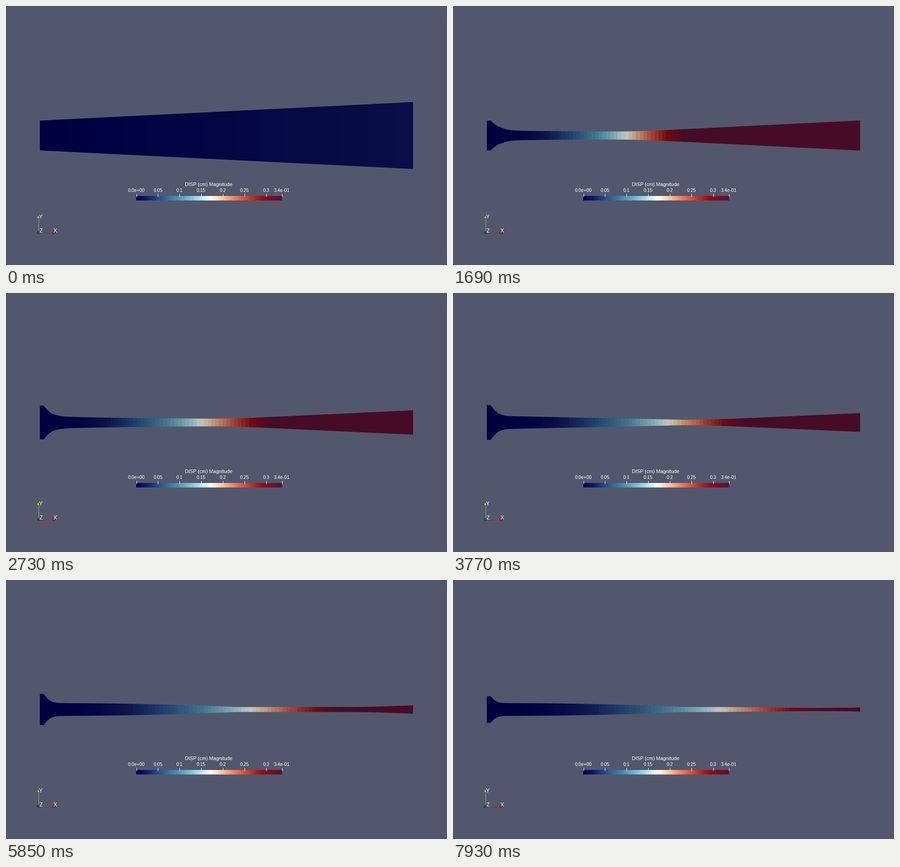
Animation, 976 px wide and 574 px high, one loop 8000 ms. Source, as a matplotlib script:

```python
import numpy as np
import matplotlib.pyplot as plt
from matplotlib.animation import FuncAnimation
from matplotlib.colors import LinearSegmentedColormap
from matplotlib.patches import Circle, Polygon
from matplotlib.path import Path

W, H, DPI = 976, 574, 64
PT = 72 / DPI                  # points per pixel
LOOP, TICK, STEP = 8000, 40, 130
LEFT, RIGHT, MID = 75, 901, 287
RAMP = 12                      # steps until the duct has closed
NECK_X = 510
SHADE = 0.78

STOPS = [
    (0, "#000054"), (.07, "#101a5f"), (.15, "#244c88"), (.3, "#5498b6"),
    (.42, "#9edae6"), (.485, "#def6fa"), (.51, "#fcfaf0"), (.54, "#feecd0"),
    (.6, "#f8be92"), (.74, "#d6523e"), (.87, "#8c0e18"), (1, "#5c1030"),
]
CMAP = LinearSegmentedColormap.from_list("disp", STOPS, N=256)

NODES = np.linspace(LEFT, RIGHT, 101)
CENTRES = (NODES[:-1] + NODES[1:]) / 2


def sigmoid(t):
    return 1 / (1 + np.exp(-t))


def soft_max(a, b, width=2):
    return (a + b + np.hypot(a - b, width)) / 2


def closed_half(k):
    """Half height at the nodes, k steps after the duct has closed."""
    # tapering inlet side, down to the neck
    neck = 5.4 + 2.6 * sigmoid((12 - k) / 2)
    power = 0.08 + 2.1 * sigmoid((k - 16) / 6)
    u = np.clip((NODES - 116) / (NECK_X - 116), 0, 1)
    body = 14 - (14 - neck) * u ** power
    # late thinning behind the neck
    thin = np.clip((k - 29) / 19, 0, 1)
    body -= 2.3 * thin * np.clip((NODES - 600) / 200, 0, 1)
    # straight outlet wedge
    end = np.interp(k, [0, 24, 32, 48], [33.3, 14.5, 9, 3.8])
    wedge = end - (0.0497 - 0.0003 * k) * (RIGHT - NODES)
    body = soft_max(body, wedge)
    # flared inlet that swings and settles
    rest = np.interp(k, [0, 16, 48], [42.5, 40, 29.5])
    inlet = rest - 9.5 * np.exp(-k / 8.5) * np.cos(np.pi * k / 4)
    reach = 14.8 - 0.108 * k
    flare = np.exp(-(np.maximum(NODES - 83.3, 0) / reach) ** 1.2)
    return body + (inlet - body) * flare


def closed_value(k):
    """Scaled displacement per cell: power law, then a straight rise."""
    shift = 7 * k / (1 + k / 75)
    d = CENTRES - (380 + shift)
    below = np.clip(1 + d / (270 + 0.93 * shift), 0, 1) ** 1.85
    above = np.maximum(d, 0) / (128 + 0.47 * shift)
    return 0.5 * (below + above)


def duct(step):
    k = max(step - 1 - RAMP, 0)
    mix = np.clip((step - 1) / RAMP, 0, 1)
    open_half = 33 + 41.2 * (NODES - LEFT) / (RIGHT - LEFT)
    open_value = 0.053 * (CENTRES - LEFT) / (RIGHT - LEFT)
    half = open_half + mix * (closed_half(k) - open_half)
    value = open_value + mix * (closed_value(k) - open_value)
    return half, np.clip(value, 0, 1)


fig = plt.figure(figsize=(W / DPI, H / DPI), dpi=DPI, facecolor="#52576e")
ax = fig.add_axes([0, 0, 1, 1])
ax.axis("off")


def label(x, y, text, px):
    ax.text(x, y, text, color="white", fontsize=px * PT, ha="center",
            va="baseline", family="Liberation Sans", zorder=5)


def line(xs, ys, color):
    ax.plot(xs, ys, color=color, lw=PT, solid_capstyle="butt", zorder=3)


def strip(colors, x0, x1, top, bottom):
    return ax.imshow(colors[None, :, :3], extent=(x0, x1, bottom, top),
                     aspect="auto", interpolation="nearest", zorder=2)


def cone(points, face, edge):
    ax.add_patch(Polygon(points, fc=face, ec=edge, lw=.6 * PT, zorder=4))


def color_bar():
    strip(CMAP((np.arange(64) + 0.5) / 64), 288, 611, 421, 431)
    label(448.7, 398.7, "DISP (cm) Magnitude", 11)
    marks = ["0.0e+00", "0.05", "0.1", "0.15", "0.2", "0.25", "0.3", "3.4e-01"]
    for n, text in enumerate(marks):
        x = min(288.5 + 47.85 * n, 610.5)
        line([x, x], [416, 423], "white")
        label(x, 411.7, text, 10.4)


def triad():
    x, y = 71.5, 502
    line([x, x], [y, 470], "#a8a49c")
    line([x, 105], [y + .5, y + .5], "#b81c1c")
    cone([(x, 462.5), (68.5, 470.5), (74.5, 470.5)], "#d8d000", "#3c3a10")
    cone([(112, y), (104, 499), (104, 505)], "#e01010", "#4a0808")
    ax.add_patch(Circle((x, y), 3.5, fc="#006414", ec="none", zorder=4))
    label(76.7, 471, "Y", 12)
    label(109, 502.3, "X", 12)
    label(77.5, 501.8, "Z", 12)


color_bar()
triad()
skin = strip(CMAP(np.zeros(100)), LEFT, RIGHT, 200, 374)
ax.set_xlim(0, W)
ax.set_ylim(H, 0)


def draw(frame):
    step = int((frame + 0.5) * TICK // STEP)
    half, value = duct(step)
    xs = np.concatenate([NODES, NODES[::-1]])
    ys = np.concatenate([MID - half, MID + half[::-1]])
    skin.set_data(SHADE * CMAP(value)[None, :, :3])
    skin.set_clip_path(Path(np.column_stack([xs, ys])), ax.transData)
    return [skin]


anim = FuncAnimation(fig, draw, frames=LOOP // TICK, interval=TICK,
                     init_func=lambda: draw(0), repeat=True, repeat_delay=0)
plt.show()
```
